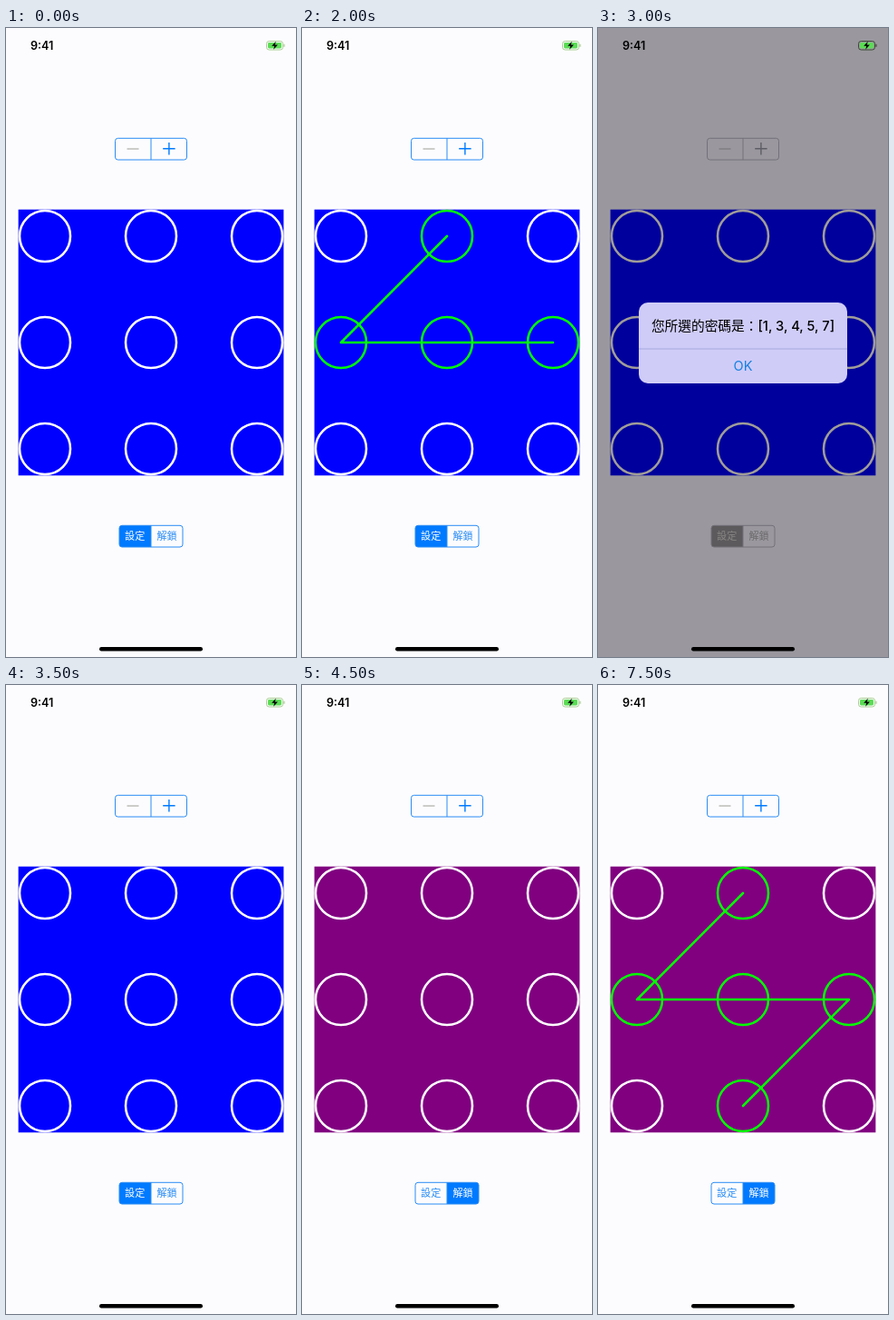
Write an HTML page that moves like this. It is 320x692 px and loops after 8000 ms.

```html
<!DOCTYPE html>
<html lang="zh-Hant">
<head>
<meta charset="utf-8">
<title>Pattern lock</title>
<style>
html, body { margin: 0; width: 100%; height: 100%; overflow: hidden; }
svg {
  display: block; width: 320px; height: 692px;
  font-family: Inter, "Noto Sans CJK TC", "Noto Sans CJK", sans-serif;
  --bg: #fcfcfe; --panel: #00f; --ring: #fff; --on: #0f0;
  --edge: #2a8cf5; --tint: #007aff; --seg: #007aff; --segText: #fff;
  --offText: #2a8cf5; --minus: #b2b4ae; --battery: #a9cf91;
}
svg.unlock { --panel: #800080; }
svg.fading {
  --bg: #d7d5d6; --panel: #0000d7; --ring: #d6d5d4; --on: #00d60c;
  --edge: #4088cc; --tint: #2070c4; --seg: #2e6cb8; --segText: #c4d2d8;
  --offText: #929a9e; --minus: #9c9c9e; --battery: #8fa878;
  --box: #4e4efc; --text: #2c2c9c; --rule: #3c3cd8; --ok: #4e4efc;
}
svg.modal {
  --bg: #9a989e; --panel: #00009c; --ring: #a09d98;
  --edge: #74707a; --tint: #5e5c64; --seg: #5c5a5c; --segText: #888684;
  --offText: #6c6a6c; --minus: #7c7a7c; --battery: #3c4a34;
  --box: #cfccf8; --text: #000; --rule: #a6a7dc; --ok: #1680e0;
}
.bg { fill: var(--bg); }
.panel { fill: var(--panel); }
.ring { fill: none; stroke: var(--ring); stroke-width: 2.56; }
.ring.on { stroke: var(--on); }
.path { fill: none; stroke: var(--on); stroke-width: 2.6; stroke-linecap: round; stroke-linejoin: round; }
.edge { fill: none; stroke: var(--edge); }
.minus { stroke: var(--minus); stroke-width: 1.3; }
.plus { stroke: var(--tint); stroke-width: 1.4; }
.seg { fill: var(--seg); }
.label { font-size: 11.1px; text-anchor: middle; fill: var(--offText); }
.label.active { fill: var(--segText); }
.box { fill: var(--box); }
.rule { stroke: var(--rule); }
.title { font-size: 14.7px; font-weight: 500; text-anchor: middle; fill: var(--text); }
.ok { font-size: 14.5px; text-anchor: middle; fill: var(--ok); }
.ghost { fill: none; stroke: #5aa2d0; stroke-width: 2.3; }
.alert, .ghost { visibility: hidden; }
.fading .alert, .modal .alert, .fading .ghost { visibility: visible; }
.fading .alert { transform: translate(160px, 346.4px) scale(1.113) translate(-160px, -346.4px); }
</style>
</head>
<body>
<svg id="stage" viewBox="0 0 320 692">
  <defs><clipPath id="inBox"><rect x="32" y="297" width="256" height="99" rx="11"/></clipPath></defs>
  <rect class="bg" width="320" height="692"/>

  <text x="27" y="24" font-size="12.6" font-weight="600">9:41</text>
  <rect x="287.5" y="14.5" width="18" height="9.5" rx="2.8" fill="none" stroke="var(--battery)"/>
  <path d="M307 17.7v3" stroke="var(--battery)" stroke-width="1.2"/>
  <rect x="289" y="16" width="15" height="6.5" rx="1.4" fill="#5bdc55"/>
  <path d="M297.8 14.8l-4.6 5h3l-1 4 4.7-5.2h-3.1z"/>

  <rect class="edge" x="120.5" y="121.3" width="79" height="23.7" rx="3"/>
  <path class="edge" d="M160 121.3v23.7"/>
  <path class="minus" d="M133.5 133h13"/>
  <path class="plus" d="M173.2 132.7h13.4M179.9 126v13.4"/>

  <rect class="panel" x="13.65" y="199.7" width="292.7" height="292.6"/>
  <g id="rings"></g>
  <path id="path" class="path"/>

  <path id="seg" class="seg"/>
  <rect class="edge" x="125" y="547.3" width="70" height="23.7" rx="3"/>
  <path class="edge" d="M160 547.3v23.7"/>
  <text id="setLabel" class="label" x="142.2" y="563.2">設定</text>
  <text id="openLabel" class="label" x="177.6" y="563.2">解鎖</text>

  <g class="alert">
    <rect class="box" x="45" y="302" width="230" height="89" rx="10"/>
    <path class="rule" d="M45 353h230"/>
    <text class="title" x="160" y="332.6">您所選的密碼是：[1, 3, 4, 5, 7]</text>
    <text class="ok" x="160" y="377.3">OK</text>
  </g>
  <g id="ghosts" clip-path="url(#inBox)"></g>
  <rect x="103" y="681" width="114" height="4.4" rx="2.2"/>
</svg>
<script>
const $ = id => document.getElementById(id);
const CODE = [1, 3, 4, 5, 7];
const LOOP = 8000;

// [start ms, theme, nodes reached]
const steps = [
  [0, '', 0],
  [500, '', 1],
  [1500, '', 3],
  [2000, '', 4],
  [2500, 'fading', 5],
  [3000, 'modal', 0],
  [3500, '', 0],
  [4000, 'unlock', 0],
  [5500, 'unlock', 1],
  [6000, 'unlock', 2],
  [6500, 'unlock', 3],
  [7000, 'unlock', 4],
  [7500, 'unlock', 5]
];

const center = i => [43 + 117 * (i % 3), 229 + 117 * Math.floor(i / 3)];

function addRing(parent, i, name) {
  const ring = document.createElementNS('http://www.w3.org/2000/svg', 'circle');
  const [x, y] = center(i);
  ring.setAttribute('cx', x);
  ring.setAttribute('cy', y);
  ring.setAttribute('r', 28);
  ring.setAttribute('class', name);
  parent.append(ring);
  return ring;
}

const rings = Array.from({ length: 9 }, (_, i) => addRing($('rings'), i, 'ring'));
[3, 4, 5].forEach(i => addRing($('ghosts'), i, 'ghost'));

function show([, theme, count]) {
  const picked = CODE.slice(0, count);
  const unlock = theme === 'unlock';
  $('stage').setAttribute('class', theme);
  rings.forEach((ring, i) => ring.classList.toggle('on', picked.includes(i)));
  const lined = count > 1 && theme !== 'fading';
  $('path').setAttribute('d', lined ? 'M' + picked.map(i => center(i).join(' ')).join('L') : '');
  $('seg').setAttribute('d', unlock
    ? 'M160 547.3h32q3 0 3 3v17.7q0 3-3 3h-32z'
    : 'M160 547.3h-32q-3 0-3 3v17.7q0 3 3 3h32z');
  $('setLabel').classList.toggle('active', !unlock);
  $('openLabel').classList.toggle('active', unlock);
}

let current;
function tick() {
  const t = performance.now() % LOOP;
  const step = steps.findLast(s => s[0] <= t);
  if (step !== current) show(current = step);
  requestAnimationFrame(tick);
}
tick();
</script>
</body>
</html>
```
